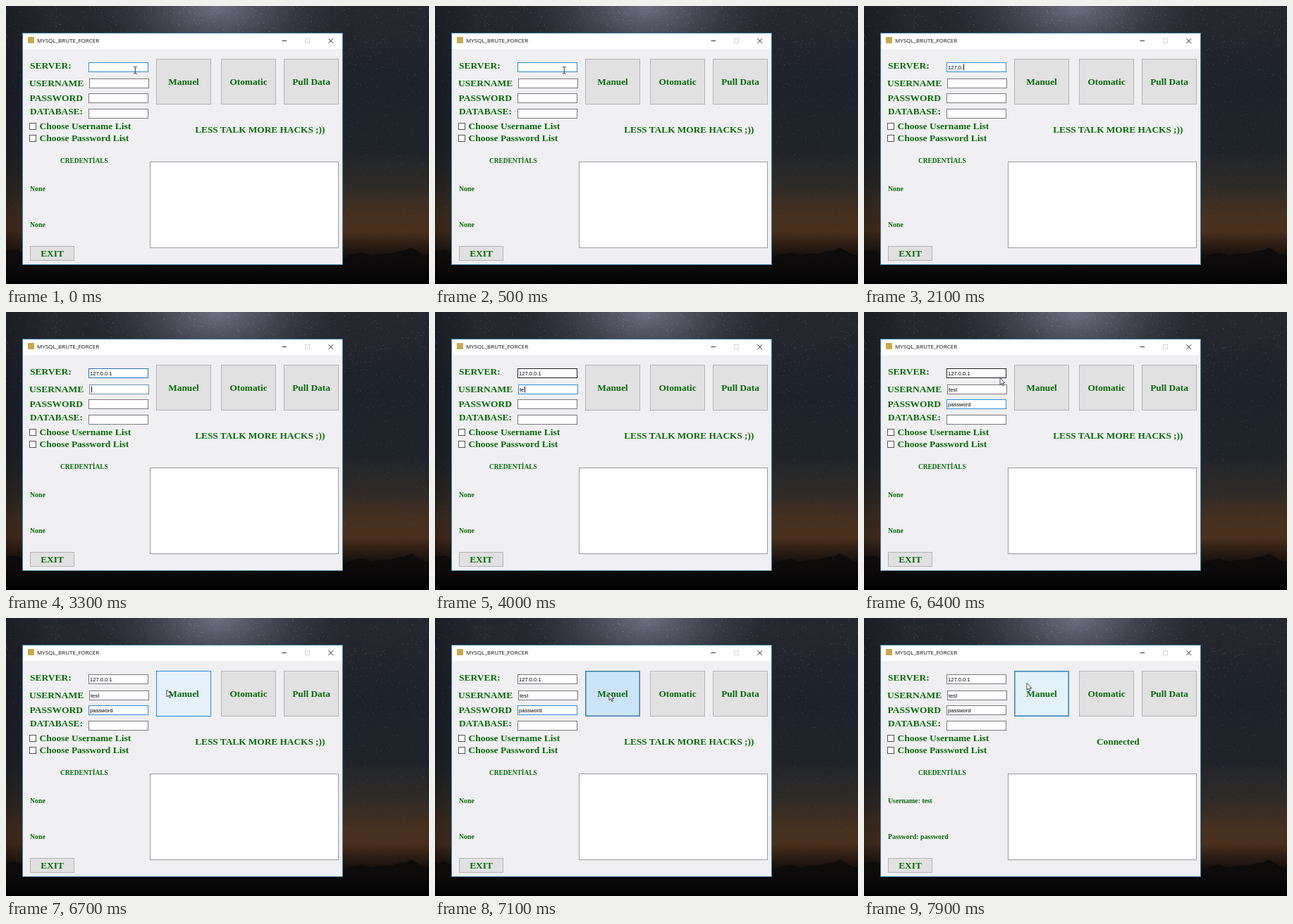
Animation of 600x395 px, one loop 8 s. Source, as an HTML page with a canvas:

```html
<!DOCTYPE html>
<html lang="en">
<head>
<meta charset="utf-8">
<title>Login form</title>
<style>
  html, body { margin: 0; width: 100%; height: 100%; overflow: hidden; background: #000; }
  canvas, svg { position: absolute; left: 0; top: 0; width: 600px; height: 395px; }
  text { font-kerning: none; white-space: pre; }
  .label { font: bold 13.3px "Liberation Serif", serif; fill: #0a6a0c; }
  .form { font-size: 13.5px; }
  .small { font-size: 9.8px; }
  .heading { font-size: 9.4px; }
  .input { font: 7.6px "Liberation Sans", sans-serif; fill: #000; }
  .title { font: 8px "Open Sans", sans-serif; fill: #111; }
  .mid { text-anchor: middle; }
</style>
</head>
<body>
<canvas id="sky" width="600" height="395"></canvas>
<svg id="ui" viewBox="0 0 600 395"></svg>
<script>
const LOOP = 8000, STEP = 100;
const BLUE = '#2f8fd8', GRAY = '#7a7a7a', DARK = '#1f2024';

function paintSky() {
  const c = document.getElementById('sky').getContext('2d');
  let seed = 7;
  const rnd = () => (seed = seed * 16807 % 2147483647) / 2147483647;
  const fill = (style, x = 0, y = 0, w = 600, h = 395) => {
    c.fillStyle = style;
    c.fillRect(x, y, w, h);
  };
  const shade = (gradient, stops) => {
    stops.forEach(([at, color]) => gradient.addColorStop(at, color));
    return gradient;
  };

  fill(shade(c.createLinearGradient(0, 0, 0, 395), [
    [0, '#26272f'], [0.3, '#1e222b'], [0.52, '#20242a'], [0.65, '#2f2b27'],
    [0.75, '#45301f'], [0.81, '#4a301c'], [0.86, '#2c1d14'], [0.9, '#15100d'], [1, '#0b0807']
  ]));
  fill(shade(c.createLinearGradient(0, 0, 60, 0), [[0, 'rgba(8,8,12,.3)'], [1, 'rgba(8,8,12,0)']]));

  // Milky Way glow behind the window's upper edge
  c.save();
  c.translate(300, 0);
  c.scale(1, 0.6);
  fill(shade(c.createRadialGradient(0, 0, 0, 0, 0, 190), [
    [0, 'rgba(150,147,168,.66)'], [0.35, 'rgba(118,116,136,.48)'], [1, 'rgba(60,60,75,0)']
  ]), -300, 0, 600, 300);
  c.restore();

  // Star dust, denser inside the glow
  for (let i = 0; i < 9000; i++) {
    const x = rnd() * 600, y = rnd() * 335;
    const glow = Math.exp(-(((x - 300) / 110) ** 2) - (y / 70) ** 2);
    const alpha = (0.02 + 0.3 * rnd() ** 5) * (1 - y / 420) + 0.16 * glow * rnd();
    fill(`rgba(205,208,222,${alpha})`, x | 0, y | 0, 1, 1);
  }

  const ridge = [[0, 348], [14, 346], [24, 351], [60, 368], [478, 360], [488, 354], [504, 350],
    [518, 355], [530, 352], [545, 352], [557, 348], [566, 347], [574, 343], [583, 348], [591, 353], [600, 355]];
  c.beginPath();
  c.moveTo(0, 395);
  ridge.forEach(p => c.lineTo(...p));
  c.lineTo(600, 395);
  c.fillStyle = shade(c.createLinearGradient(0, 343, 0, 392), [[0, '#0f0c0c'], [0.5, '#0c0a0a'], [1, '#030303']]);
  c.fill();
  fill('#000', 0, 391, 600, 4);
}

const ui = document.getElementById('ui');

function add(tag, attrs, content = '') {
  const node = document.createElementNS('http://www.w3.org/2000/svg', tag);
  for (const key in attrs) node.setAttribute(key, attrs[key]);
  node.textContent = content;
  return ui.appendChild(node);
}
const box = (x, y, width, height, fill, stroke = 'none') => add('rect', { x, y, width, height, fill, stroke });
const text = (x, y, content, cls = 'label') => add('text', { x, y, class: cls }, content);
const path = (d, stroke, fill = 'none') => add('path', { d, stroke, fill });
const show = (node, on) => node.setAttribute('visibility', on ? 'visible' : 'hidden');

function button(x, y, w, h, name) {
  const face = box(x, y, w, h, '#e1e1e1', '#b4b4b4');
  const focus = box(x + 1, y + 1, w - 2, h - 2, 'none', '#7fb2d3');
  show(focus, false);
  text(x + w / 2, y + h / 2 + 4.2, name, 'label mid');
  return { face, focus };
}

function field(x, y) {
  const frame = box(x, y, 84, 13, '#fff', GRAY);
  const value = text(x + 1.5, y + 9.5, '', 'input');
  const caret = box(0, y + 2, 1, 9, '#111');
  return { x, frame, value, caret };
}

paintSky();

box(23.5, 38.5, 454, 329, '#f0eff1', '#3b7f9f');
box(24, 39, 453, 22, '#fff');
box(31, 44, 9, 9, '#c9a94b');
text(44, 52, 'MYSQL_BRUTE_FORCER', 'title');
path('M391.5 49.5h6.5', '#333');
path('M424.5 46.5h6v6h-6z', '#d4d4d4');
path('M457.5 46.3l6.5 6.5m0-6.5l-6.5 6.5', '#222');

text(34, 89, 'SERVER:', 'label form');
text(33, 114, 'USERNAME', 'label form');
text(33.5, 135, 'PASSWORD', 'label form');
text(34, 154, 'DATABASE:');
[['Username', 166.5], ['Password', 183.5]].forEach(([kind, y]) => {
  box(33.5, y, 9, 9, '#fff', '#555');
  text(47.5, y + 8.7, `Choose ${kind} List`, 'label form');
});

const fields = {
  server: field(117.5, 80.5),
  user: field(118.5, 103.5),
  pass: field(117.5, 124.5),
  base: field(117.5, 146.5)
};

const connect = button(213.5, 75.5, 77, 64, 'Manuel');
button(305.5, 75.5, 77, 64, 'Otomatic');
button(394.5, 75.5, 77, 64, 'Pull Data');
button(34.5, 341.5, 62, 20, 'EXIT');

const status = text(360.3, 180, '', 'label mid');
text(77, 223, 'CREDENTİALS', 'label heading');
const foundUser = text(34, 263, '', 'label small');
const foundPass = text(34, 314, '', 'label small');
box(204.5, 221.5, 267, 122, '#fff', '#999ca2');

const beam = path('M181 86.5h1.7l.6.6.6-.6h1.7M183.3 87v8.6M181 96h1.7l.6-.6.6.6h1.7', '#333');
const arrow = path('M0 0v9.8l2.3-2.1 1.6 3.6 1.5-.7-1.6-3.4h3.1z', '#222', '#fff');
arrow.setAttribute('stroke-width', 0.8);

// Tables of [start time, value]; a value holds until the next entry.
const typed = {
  server: [[0, 0], [700, 1], [800, 2], [1000, 3], [1500, 4], [1800, 5], [2100, 6], [2400, 7], [2700, 8], [3000, 9]],
  user: [[0, 0], [3900, 1], [4000, 2], [4200, 3], [4300, 4]],
  pass: [[0, 0], [5100, 1], [5300, 2], [5400, 4], [5600, 5], [5700, 6], [5900, 8]]
};
const values = { server: '127.0.0.1', user: 'test', pass: 'password' };
const frames = {
  server: [[0, BLUE], [3300, '#2577b0'], [3400, '#24425c'], [3500, DARK], [6500, '#4c4c50'], [6600, GRAY]],
  user: [[0, GRAY], [3300, '#6a93ad'], [3400, '#4790c4'], [3500, BLUE], [4500, '#5c88a8'], [4600, GRAY]],
  pass: [[0, GRAY], [4500, '#5c8eb2'], [4600, BLUE], [7200, GRAY]]
};
const carets = [[0, ''], [700, 'server'], [3300, 'user'], [4500, 'pass'], [6400, '']];
const faces = [
  [0, ['#e1e1e1', '#b4b4b4']],
  [6600, ['#e5f1fb', '#2b88d8']],
  [7000, ['#cce4f7', '#41809f']],
  [7300, ['#e3f1fb', '#3a86b8']]
];
const pointer = [[6400, 193, 93.5], [6900, 247, 107], [7400, 247, 107], [7800, 231, 92.5], [8000, 231, 92.5]];

const at = (table, t) => table.findLast(([start]) => start <= t)[1];

function along(points, t) {
  const i = Math.max(0, points.findLastIndex(p => p[0] <= t));
  const [t0, x0, y0] = points[i];
  const [t1, x1, y1] = points[Math.min(i + 1, points.length - 1)];
  const k = t1 > t0 ? Math.max(0, (t - t0) / (t1 - t0)) : 0;
  const ease = k * k * (3 - 2 * k);
  return [x0 + (x1 - x0) * ease, y0 + (y1 - y0) * ease];
}

function render(t) {
  const active = at(carets, t);
  for (const key in values) {
    const { x, frame, value, caret } = fields[key];
    value.textContent = values[key].slice(0, at(typed[key], t));
    frame.setAttribute('stroke', at(frames[key], t));
    caret.setAttribute('x', Math.round(x + 2 + value.getComputedTextLength()));
    show(caret, key === active);
  }
  show(fields.base.caret, false);

  const [fill, stroke] = at(faces, t);
  connect.face.setAttribute('fill', fill);
  connect.face.setAttribute('stroke', stroke);
  show(connect.focus, t >= 7000);

  const done = t >= 7400;
  status.textContent = done ? 'Connected' : 'LESS TALK MORE HACKS ;))';
  foundUser.textContent = done ? `Username: ${values.user}` : 'None';
  foundPass.textContent = done ? `Password: ${values.pass}` : 'None';

  show(beam, t < 700);
  show(arrow, t >= 6400);
  arrow.setAttribute('transform', `translate(${along(pointer, t)})`);
}

const begin = performance.now();
let last = -1;
function tick() {
  const t = Math.floor((performance.now() - begin) % LOOP / STEP) * STEP;
  if (t !== last) render(last = t);
  requestAnimationFrame(tick);
}
tick();
</script>
</body>
</html>
```
